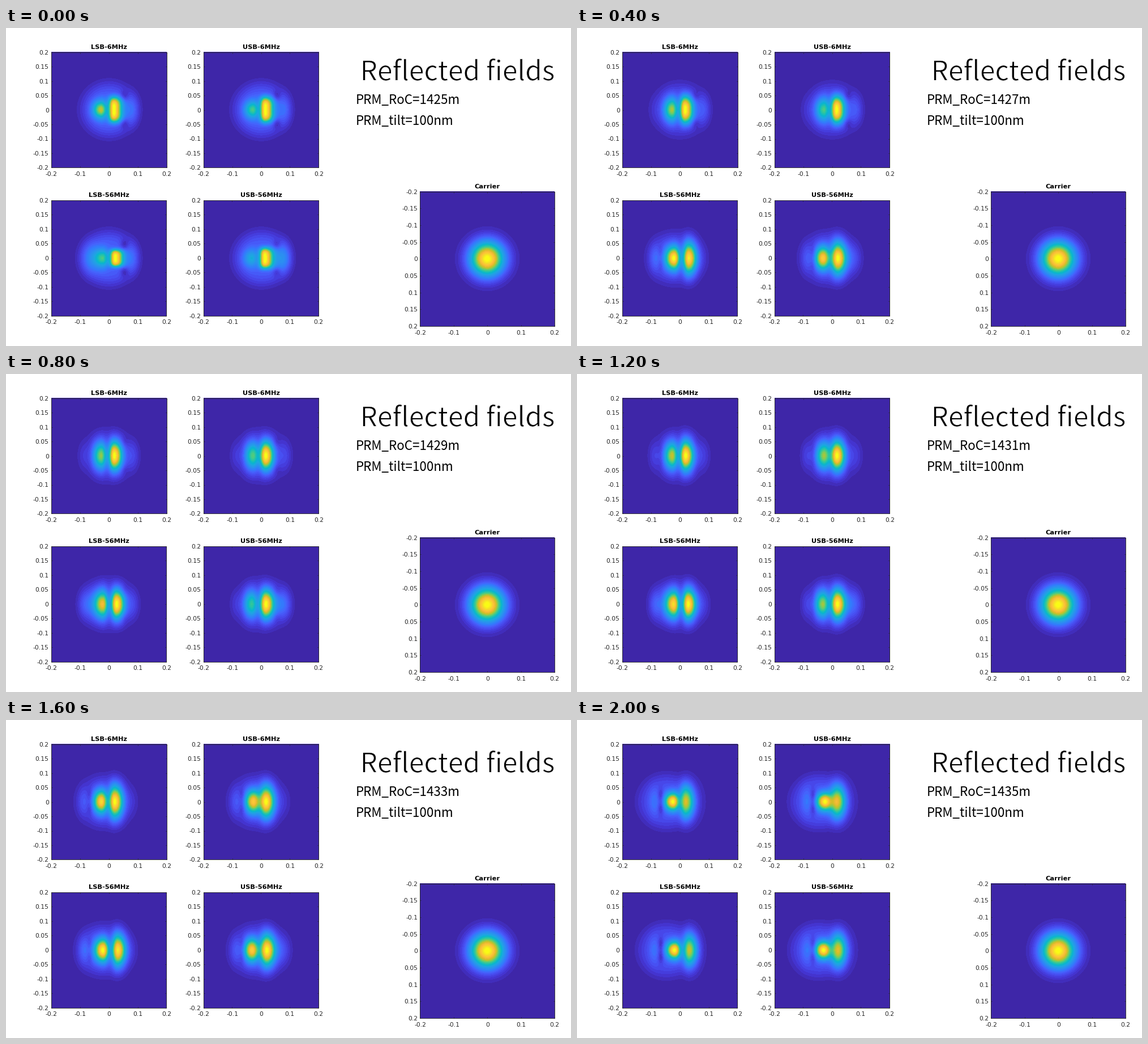
Recreate the animation shown at these times as a matplotlib script. Size 998 by 561 pixels, loop 2400 ms.

```python
import numpy as np
import matplotlib.pyplot as plt
from matplotlib import patheffects
from matplotlib.animation import FuncAnimation
from matplotlib.colors import LinearSegmentedColormap

W, H, DPI = 998, 561, 64
FRAMES, STEP = 6, 400
SIDE = 203.6
INK = "#262626"

STOPS = ["#3e26a8", "#4537d5", "#484df0", "#4563fd", "#327cfc", "#2d8cf3",
         "#259be8", "#1ca9df", "#08b5d0", "#19bfb6", "#37c897", "#64cd6f",
         "#9dc943", "#d1bf27", "#f0ba36", "#fec338", "#f5dc2a", "#f9fb15"]
CMAP = LinearSegmentedColormap.from_list("heat", STOPS, N=40)

# Each pattern: left lobe x, its height at start, middle and end, right lobe x
# at start and end, right lobe's first y-radius, side glow, side (-1 lower, 1 upper)
LSB6 = dict(xl=-14, left=(.60, .56, .86), xr=(8.5, 10.5), tall=22, glow=0, side=-1)
USB6 = dict(xl=-15, left=(.45, .52, .82), xr=(7, 9), tall=22, glow=0, side=1)
LSB56 = dict(xl=-11, left=(.42, .74, .88), xr=(11, 16.5), tall=15, glow=.14, side=-1)
USB56 = dict(xl=-17, left=(.27, .52, .86), xr=(6, 10.5), tall=18, glow=.12, side=1)

# The 56 MHz plots show their fifth pattern in the second step as well
IN_ORDER, REPEATED = range(FRAMES), (0, 4, 2, 3, 4, 5)
PANELS = [
    ("LSB-6MHz", 80.2, 42.8, LSB6, IN_ORDER),
    ("USB-6MHz", 348.8, 42.8, USB6, IN_ORDER),
    ("LSB-56MHz", 79.9, 304, LSB56, REPEATED),
    ("USB-56MHz", 348.6, 304, USB56, REPEATED),
]

X, Y = np.meshgrid(*[np.linspace(-SIDE / 2, SIDE / 2, 408)] * 2)


def bump(x, y, rx, ry, power=2):
    return np.exp(-np.hypot((X - x) / rx, (Y - y) / ry) ** power)


def lobe(x, way, inner, ry, power=2):
    """Bump with a steep inner flank and a soft outer one."""
    rx = np.where((X - x) * way > 0, 14, inner)
    return np.exp(-((X - x) / rx) ** 2 - np.abs(Y / ry) ** power)


def pair(x, y, rx, ry):
    return bump(x, y, rx, ry) + bump(x, -y, rx, ry)


def field(s, xl, left, xr, tall, glow, side):
    inner = 9 + (2 + side) * s
    # two main lobes
    z = np.interp(s, (0, .5, 1), left) * lobe(
        xl + 1.5 * s ** 4, -1, inner, 15 + 9 * np.sin(np.pi * s))
    z += (.86 - .22 * s ** 5) * lobe(
        np.interp(s, (0, 1), xr), 1, inner,
        np.interp(s, (0, .4, 1), (tall, 25, 28)), 2 + 2 * (1 - s) ** 5)
    # wide halo, drifting left at the end
    z += (.07 + .1 * (2 * s - 1.1) ** 2) * bump(-25 * s ** 4, 0, 48, 47, 4)
    z += glow * (1 - s ** 4) * bump(33 * side, 0, 17, 26)
    # outer crescents, right ones fading into left ones
    z += .11 * (1 - s) * bump(42, 0, 11, 25) + .08 * s * bump(-46, 0, 9, 23)
    z += .06 * s ** 4 * bump(22, 0, 24, 42)
    # dark spots beside them
    z -= .1 * (1 - s) ** 2 * pair(27, 24, 7, 9)
    z -= .12 * s ** 3 * pair(-34, 11, 5, 12)
    z = np.clip(z, 0, None)
    return z / z.max()


FIELDS = [[field(order[k] / (FRAMES - 1), **spec) for *_, spec, order in PANELS]
          for k in range(FRAMES)]
BEAM = bump(0, 0, 25.5, 25.5)

fig = plt.figure(figsize=(W / DPI, H / DPI), dpi=DPI, facecolor="white")
ax = fig.add_axes([0, 0, 1, 1])


def px(v):
    return v * 72 / DPI


def label(x, y, s, size, **kw):
    kw = {"family": "DejaVu Sans", "color": INK, **kw}
    return ax.text(x, y, s, fontsize=px(size), va="baseline", **kw)


def plot(title, x0, y0, side, z, flip=False):
    x1, y1 = x0 + side, y0 + side
    ax.imshow(z, cmap=CMAP, vmin=0, vmax=1, extent=(x0, x1, y1, y0),
              aspect="auto", interpolation="bilinear")
    ax.plot([x0, x1, x1, x0, x0], [y0, y0, y1, y1, y0], color=INK, lw=px(.9))
    tick = dict(color=INK, lw=px(.6))
    for i in range(9):
        v = (i - 4) * .05
        text = f"{v:.2g}"
        y = y0 + side * (i if flip else 8 - i) / 8
        label(x0 - 4.5, y + 3.9, text, 10.8, ha="right")
        ax.plot([x0, x0 + 2], [y, y], **tick)
        ax.plot([x1 - 2, x1], [y, y], **tick)
        if i % 2 == 0:
            x = x0 + side * i / 8
            label(x, y1 + 14.5, text, 10.8, ha="center")
            ax.plot([x, x], [y1 - 2, y1], **tick)
            ax.plot([x, x], [y0, y0 + 2], **tick)
    label(x0 + side / 2, y0 - 5.6, title, 11.4, ha="center", weight="bold", color="black")


def draw(k):
    ax.clear()
    for (title, x, y, *_), z in zip(PANELS, FIELDS[k]):
        plot(title, x, y, SIDE, z)
    plot("Carrier", 731.5, 288.7, 237.4, BEAM, flip=True)

    sans = dict(family="Noto Sans CJK JP", color="black")
    head = label(625.5, 92.5, "Reflected fields", 48, **sans)
    thin = patheffects.Stroke(linewidth=px(1), foreground="white")
    head.set_path_effects([patheffects.Normal(), thin])
    label(617.5, 134.3, f"PRM_RoC={1425 + 2 * k}m", 22.4, **sans)
    label(617.5, 171.3, "PRM_tilt=100nm", 22.4, **sans)

    ax.set(xlim=(0, W), ylim=(H, 0))
    ax.axis("off")
    return []


anim = FuncAnimation(fig, draw, frames=FRAMES, interval=STEP, repeat=True,
                     repeat_delay=0, init_func=lambda: draw(0))
plt.show()
```
